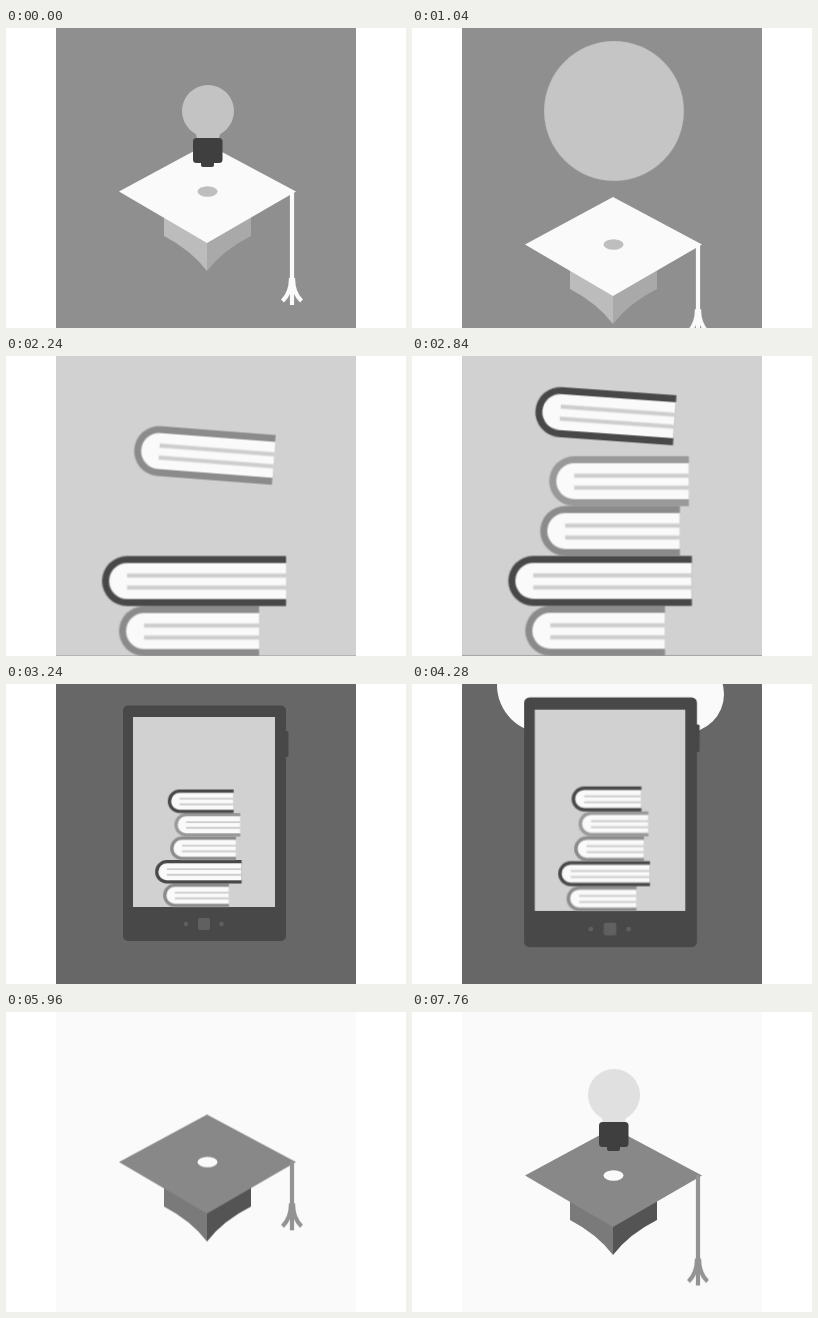
Recreate the animation shown at these times as an HTML page. Size 400 px wide and 300 px high, loop 7800 ms.

```html
<!DOCTYPE html>
<html lang="en">
<head>
<meta charset="utf-8">
<title>Learning loop</title>
<style>
html, body { margin: 0; width: 100%; height: 100%; overflow: hidden; background: #fff; }
svg { display: block; width: 400px; height: 300px; }
.anim, .anim * { animation: 7.8s linear infinite both; }

/* Backdrop and scene switches */
#back { animation-name: back; animation-timing-function: step-end; }
@keyframes back {
  0% { fill: #8f8f8f; }
  18.46% { fill: #676767; }
  70.51%, 100% { fill: #fafafa; }
}
#reading { animation-name: reading; animation-timing-function: step-end; }
@keyframes reading {
  0% { visibility: hidden; }
  18.46% { visibility: visible; }
  70.51%, 100% { visibility: hidden; }
}
#graduate { animation-name: graduate; animation-timing-function: step-end; }
@keyframes graduate {
  0% {
    visibility: visible;
    --board: #fafafa; --left: #bcbcbc; --right: #a9a9a9;
    --hole: #bebebe; --cord: #fafafa; --glass: #c3c3c3;
  }
  18.46% { visibility: hidden; }
  70.51%, 100% {
    visibility: visible;
    --board: #888; --left: #7a7a7a; --right: #545454;
    --hole: #fafafa; --cord: #939393; --glass: #e0e0e0;
  }
}

/* Cap */
#cap { animation-name: cap; animation-timing-function: ease-in-out; }
@keyframes cap {
  0%, 10.77% { transform: translateY(0); }
  5.13% { transform: translateY(-3px); }
  18%, 71.28% { transform: translateY(200px); animation-timing-function: ease-out; }
  74.36% { transform: translateY(-25px); }
  76.41% { transform: translateY(-13.5px); }
  80% { transform: translateY(-3px); }
  85% { transform: translateY(3px); }
  92% { transform: translateY(-3px); }
  100% { transform: translateY(0); }
}
#cord { animation-name: cord; animation-timing-function: ease-in-out; }
@keyframes cord {
  0% { transform: scaleY(1); }
  10.77% { transform: scaleY(.75); }
  71.28% { transform: scaleY(.9); }
  76.41% { transform: scaleY(.48); }
  92.31% { transform: scaleY(.62); }
  99.49% { transform: scaleY(.96); }
  100% { transform: scaleY(1); }
}
#fan { animation-name: fan; animation-timing-function: ease-in-out; }
@keyframes fan {
  0% { transform: translateY(87px); }
  10.77% { transform: translateY(65.25px); }
  71.28% { transform: translateY(78.3px); }
  76.41% { transform: translateY(41.76px); }
  92.31% { transform: translateY(53.94px); }
  99.49% { transform: translateY(83.52px); }
  100% { transform: translateY(87px); }
}
.cord { fill: none; stroke: var(--cord); stroke-width: 4.2; }

/* Bulb */
#bulb { animation-name: bulb; animation-timing-function: ease-in-out; }
@keyframes bulb {
  0%, 10.77% { transform: translateY(0) scale(1); }
  5.13% { transform: translateY(-26px) scale(1); }
  18%, 83.08% { transform: translateY(0) scale(0); }
  87.18% { transform: translateY(-14px) scale(1); }
  92.82% { transform: translateY(-21px) scale(1); }
  99.49%, 100% { transform: translateY(0) scale(1); }
}
#glow { animation-name: glow; }
@keyframes glow {
  0% { transform: scale(0); animation-timing-function: step-end; }
  10.77% { transform: scale(1); fill: #c3c3c3; animation-timing-function: ease-in; }
  17.95% { transform: scale(10.5); fill: #d1d1d1; animation-timing-function: step-end; }
  18.46%, 100% { transform: scale(0); }
}

/* Books */
.drop { animation-name: drop; }
@keyframes drop {
  0%, 18.26% {
    translate: 0 var(--from); rotate: 4.4deg;
    animation-timing-function: cubic-bezier(.333, 0, .667, .333);
  }
  22% { rotate: 4.4deg; }
  22.36% { translate: 0 0; }
  22.87% { rotate: 0deg; }
  100% { translate: 0 0; rotate: 0deg; }
}
.lift { animation-name: lift; }
@keyframes lift {
  0%, 54.87% { transform: translateY(0); animation-timing-function: ease-in; }
  58.2%, 100% { transform: translateY(-460px); }
}

/* Tablet and cloud */
#tablet { animation-name: tablet; animation-timing-function: ease-in-out; }
@keyframes tablet {
  0%, 36.15% { transform: translate(200px, 300px) scale(2.128); }
  41.54% { transform: translate(198px, 223px) scale(1); }
  46.15% { transform: translate(198px, 228px) scale(1.09); }
  51.28%, 62.05% { transform: translate(198px, 227px) scale(1.06); }
  65.64% { transform: translate(198px, 463.6px) scale(.84); }
  68%, 100% { transform: translate(198px, 800px) scale(.84); }
}
#cloud { animation-name: cloud; animation-timing-function: ease-in-out; }
@keyframes cloud {
  0%, 51.28% { transform: translate(203px, -85px); }
  54.36%, 62.05% { transform: translate(203px, -8px); }
  65.64% { transform: translate(203px, 262px) scale(1); animation-timing-function: ease-in; }
  70.26%, 100% { transform: translate(203px, 262px) scale(7); }
}
</style>
</head>
<body>
<svg viewBox="0 0 400 300">
  <clipPath id="stage"><path d="M50 0H350V300H50z"/></clipPath>
  <clipPath id="screen"><path d="M127 33H269V223H127z"/></clipPath>
  <g clip-path="url(#stage)"><g class="anim">
    <rect id="back" x="50" width="300" height="300"/>

    <g id="reading">
      <g id="cloud" fill="#fafafa">
        <circle cy="-25" r="60.5"/>
        <circle cx="-70" cy="9" r="48"/>
        <circle cx="70" cy="18" r="39"/>
        <path d="M-70 0H70V57H-70z"/>
      </g>
      <g id="tablet"><g transform="translate(-198 -223)">
        <rect x="278" y="47" width="4.5" height="26" rx="1.5" fill="#484848"/>
        <rect x="117" y="21.5" width="163" height="235.5" rx="5" fill="#484848"/>
        <path d="M127 33H269V223H127z" fill="#d1d1d1"/>
        <g fill="#606060">
          <rect x="192" y="234" width="12" height="12" rx="2"/>
          <circle cx="180" cy="240" r="2.2"/>
          <circle cx="215.5" cy="240" r="2.2"/>
        </g>
        <g clip-path="url(#screen)">
          <g id="books" transform="translate(198 223) scale(.47) translate(-200 -300)"></g>
        </g>
      </g></g>
    </g>

    <g id="graduate">
      <g id="cap">
        <path d="M158 185V208Q185 222 201 243V185z" fill="var(--left)"/>
        <path d="M245 185V208Q217 222 201 243V185z" fill="var(--right)"/>
        <path d="M113 163.5L201 116L290 163.5L201 215z" fill="var(--board)"/>
        <ellipse cx="201.5" cy="163.5" rx="10" ry="5.2" fill="var(--hole)"/>
        <g transform="translate(286 163)">
          <path id="cord" class="cord" d="M0 0V87"/>
          <g id="fan">
            <path class="cord" d="M0 -1V27M-1 0Q-1 15 -9.5 23M1 0Q1 15 9.5 23"/>
          </g>
        </g>
      </g>
      <g transform="translate(202 163)"><g id="bulb">
        <g fill="var(--glass)">
          <circle cy="-80" r="26"/>
          <path d="M-14 -60Q-11 -57 -11 -50H11Q11 -57 14 -60z"/>
        </g>
        <g fill="#3f3f3f">
          <rect x="-15" y="-53" width="29.5" height="25" rx="3.5"/>
          <rect x="-7" y="-31" width="13" height="7" rx="2"/>
        </g>
      </g></g>
    </g>
    <g transform="translate(202 83)"><circle id="glow" r="26"/></g>
  </g></g>
</svg>
<script>
// Left edge, width and cover colour, from the bottom of the pile upwards
const pile = [
  [113, 140, '#8b8b8b'],
  [96, 184, '#484848'],
  [128, 140, '#8b8b8b'],
  [137, 140, '#999'],
  [123, 140, '#484848']
];

function book([x, w, cover], i) {
  const y = 275 - 50 * i;
  const end = w / 2;
  const spine = 25 - end;
  const shape = r => `M${end} ${-r}H${spine}a${r} ${r} 0 0 0 0 ${2 * r}H${end}z`;
  return `<g transform="translate(${x + end} ${y})">
    <g class="lift" style="animation-delay:${(4 - i) * 60}ms">
      <g class="drop" style="--from:${-40 - y}px;animation-delay:${i * 280}ms">
        <path d="${shape(25)}" fill="${cover}"/>
        <path d="${shape(18)}" fill="#fafafa"/>
        <path d="M${spine} -5.5H${end}M${spine} 6.5H${end}" stroke="#cdcdcd" stroke-width="4"/>
      </g>
    </g>
  </g>`;
}

document.getElementById('books').innerHTML = pile.map(book).join('');
</script>
</body>
</html>
```
